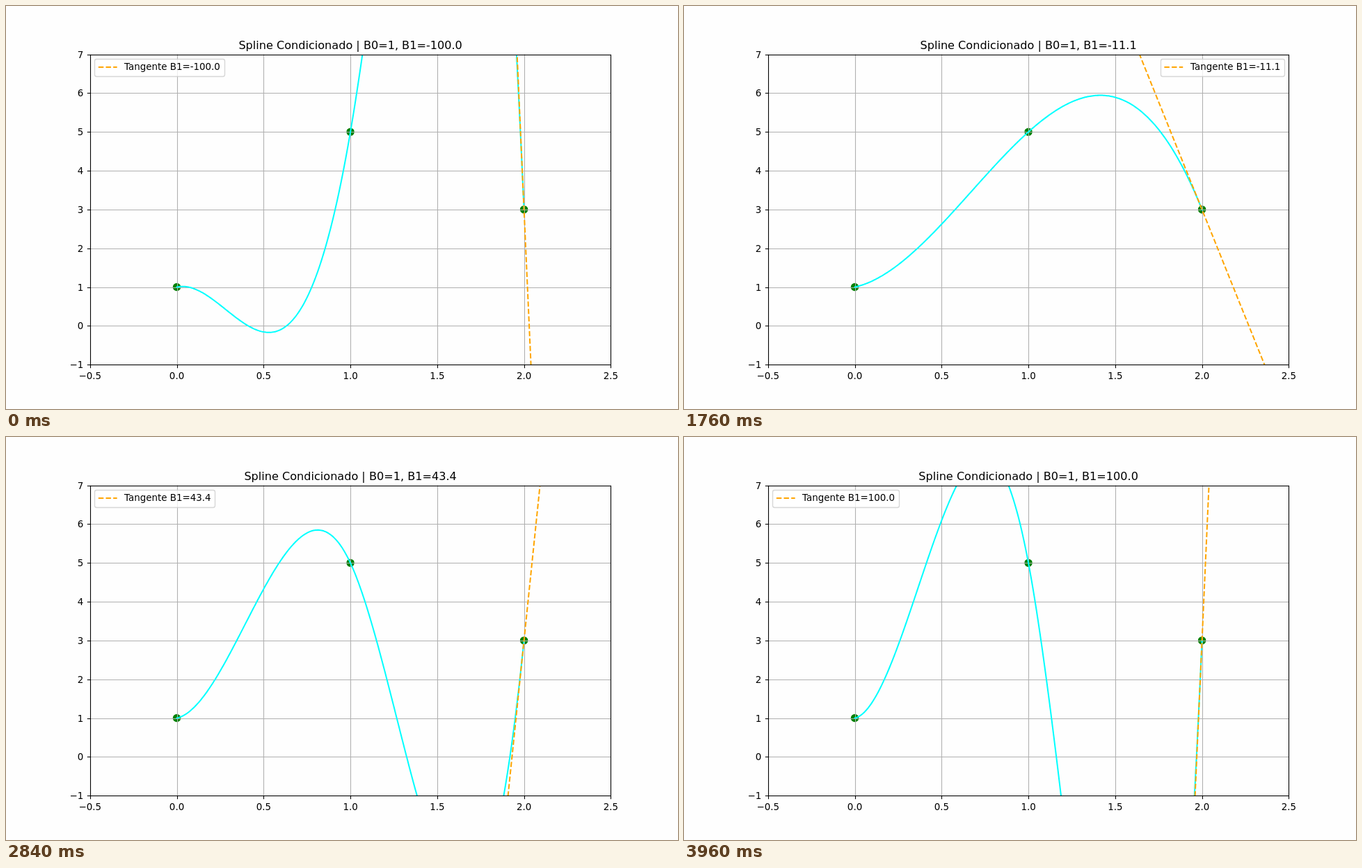
Write an HTML page with a canvas that moves like this. It is 966 px wide and 580 px high and loops after 4000 ms.

```html
<!DOCTYPE html>
<html lang="es">
<head>
<meta charset="utf-8">
<title>Spline Condicionado</title>
<style>
  html, body { margin: 0; width: 100%; height: 100%; overflow: hidden; background: #fefefe; }
  canvas { display: block; }
</style>
</head>
<body>
<canvas id="plot" width="966" height="580"></canvas>
<script>
const ctx = document.getElementById('plot').getContext('2d');
const WIDTH = 966, HEIGHT = 580;
const LEFT = 120.75, RIGHT = 869.4, TOP = 69.6, BOTTOM = 516.2;
const PT = 96.6 / 72, EM = 10 * PT;
const STEPS = 100, STEP_MS = 40;
const START_SLOPE = 1;
const KNOTS = [[0, 1], [1, 5], [2, 3]];
const THIN = 0.8 * PT, THICK = 1.5 * PT;
const DASH = [3.7 * THICK, 1.6 * THICK];

const px = x => LEFT + (x + 0.5) / 3 * (RIGHT - LEFT);
const py = y => BOTTOM - (y + 1) / 8 * (BOTTOM - TOP);
const snap = v => Math.floor(v + 0.5) + 0.5;
const font = size => `${size * PT}px "DejaVu Sans", sans-serif`;

function line(points, color, width, dash = [], cap = 'butt') {
  ctx.beginPath();
  points.forEach(([x, y]) => ctx.lineTo(x, y));
  ctx.strokeStyle = color;
  ctx.lineWidth = width;
  ctx.lineCap = cap;
  ctx.lineJoin = 'round';
  ctx.setLineDash(dash);
  ctx.stroke();
}

function label(text, x, y, size, align) {
  ctx.font = font(size);
  ctx.textAlign = align;
  ctx.fillStyle = '#000';
  ctx.fillText(text, x, y);
}

// Clamped cubic spline through three evenly spaced knots, in Hermite form.
function spline(x, endSlope) {
  const [a, b, c] = KNOTS.map(k => k[1]);
  const slopes = [START_SLOPE, (3 * (c - a) - START_SLOPE - endSlope) / 4, endSlope];
  const i = x < 1 ? 0 : 1, t = x - i, u = 1 - t;
  return KNOTS[i][1] * (1 + 2 * t) * u * u + slopes[i] * t * u * u
       + KNOTS[i + 1][1] * t * t * (3 - 2 * t) - slopes[i + 1] * t * t * u;
}

function drawGrid() {
  for (let x = -0.5; x <= 2.5; x += 0.5) {
    line([[snap(px(x)), TOP], [snap(px(x)), BOTTOM]], '#b0b0b0', THIN);
  }
  for (let y = -1; y <= 7; y++) {
    line([[LEFT, snap(py(y))], [RIGHT, snap(py(y))]], '#b0b0b0', THIN);
  }
}

function drawAxes() {
  const tick = 3.5 * PT, minus = s => s.replace('-', '\u2212');
  const l = snap(LEFT), r = snap(RIGHT), t = snap(TOP), b = snap(BOTTOM);
  for (let x = -0.5; x <= 2.5; x += 0.5) {
    line([[snap(px(x)), b], [snap(px(x)), b + tick]], '#000', THIN);
    label(minus(x.toFixed(1)), px(x), 537, 10, 'center');
  }
  for (let y = -1; y <= 7; y++) {
    line([[l, snap(py(y))], [l - tick, snap(py(y))]], '#000', THIN);
    label(minus(String(y)), LEFT - 2 * tick, Math.round(py(y) + 5), 10, 'right');
  }
  ctx.setLineDash([]);
  ctx.lineJoin = 'miter';
  ctx.strokeRect(l, t, r - l, b - t);
}

function drawMarkers() {
  ctx.fillStyle = '#008000';
  for (const [x, y] of KNOTS) {
    ctx.beginPath();
    ctx.arc(px(x), py(y), (Math.sqrt(50) + 1.5) / 2 * PT, 0, 2 * Math.PI);
    ctx.fill();
  }
}

function drawSpline(endSlope) {
  const points = [];
  for (let i = 0; i <= 300; i++) {
    const x = i / 150;
    points.push([px(x), py(spline(x, endSlope))]);
  }
  line(points, '#00ffff', THICK, [], 'square');
}

// The dash pattern starts where the line enters the stage.
function drawTangent(slope) {
  const x0 = px(1.5), y0 = py(3 - slope / 2);
  const x1 = px(2.5), y1 = py(3 + slope / 2);
  const entryY = Math.max(-1, Math.min(HEIGHT + 1, y0));
  const entryX = x0 + (entryY - y0) * (x1 - x0) / (y1 - y0);
  line([[entryX, entryY], [x1, y1]], '#ffa500', THICK, DASH);
}

function drawLegend(slope) {
  const text = `Tangente B1=${slope.toFixed(1)}`;
  ctx.font = font(10);
  const pad = 0.4 * EM, margin = 0.5 * EM;
  const width = 2 * pad + 2.8 * EM + ctx.measureText(text).width;
  // The upper right corner is preferred while no line crosses it.
  const rightFree = slope > -14 && slope < 8;
  const x = rightFree ? RIGHT - margin - width : LEFT + margin;
  const l = snap(x), r = snap(x + width), t = 76.5, b = 101.5;
  ctx.beginPath();
  ctx.roundRect(l, t, r - l, b - t, 0.2 * EM);
  ctx.fillStyle = 'rgba(255,255,255,0.8)';
  ctx.fill();
  ctx.strokeStyle = 'rgba(204,204,204,0.8)';
  ctx.lineWidth = PT;
  ctx.setLineDash([]);
  ctx.stroke();
  const handle = x + pad;
  line([[handle, 88], [handle + 2 * EM, 88]], '#ffa500', THICK, DASH);
  label(text, Math.round(handle + 2.8 * EM), 92, 10, 'left');
}

function draw(now) {
  const step = Math.floor(now / STEP_MS) % STEPS;
  const slope = -100 + 200 * step / (STEPS - 1);
  ctx.fillStyle = '#fefefe';
  ctx.fillRect(0, 0, WIDTH, HEIGHT);
  drawMarkers();
  drawGrid();
  ctx.save();
  ctx.beginPath();
  ctx.rect(121, 70, 748, 446);
  ctx.clip();
  drawSpline(slope);
  drawTangent(slope);
  ctx.restore();
  drawAxes();
  label(`Spline Condicionado | B0=${START_SLOPE}, B1=${slope.toFixed(1)}`,
    (LEFT + RIGHT) / 2, 62, 12, 'center');
  drawLegend(slope);
}

const start = performance.now();
function tick() {
  draw(performance.now() - start);
  requestAnimationFrame(tick);
}
tick();
</script>
</body>
</html>
```
